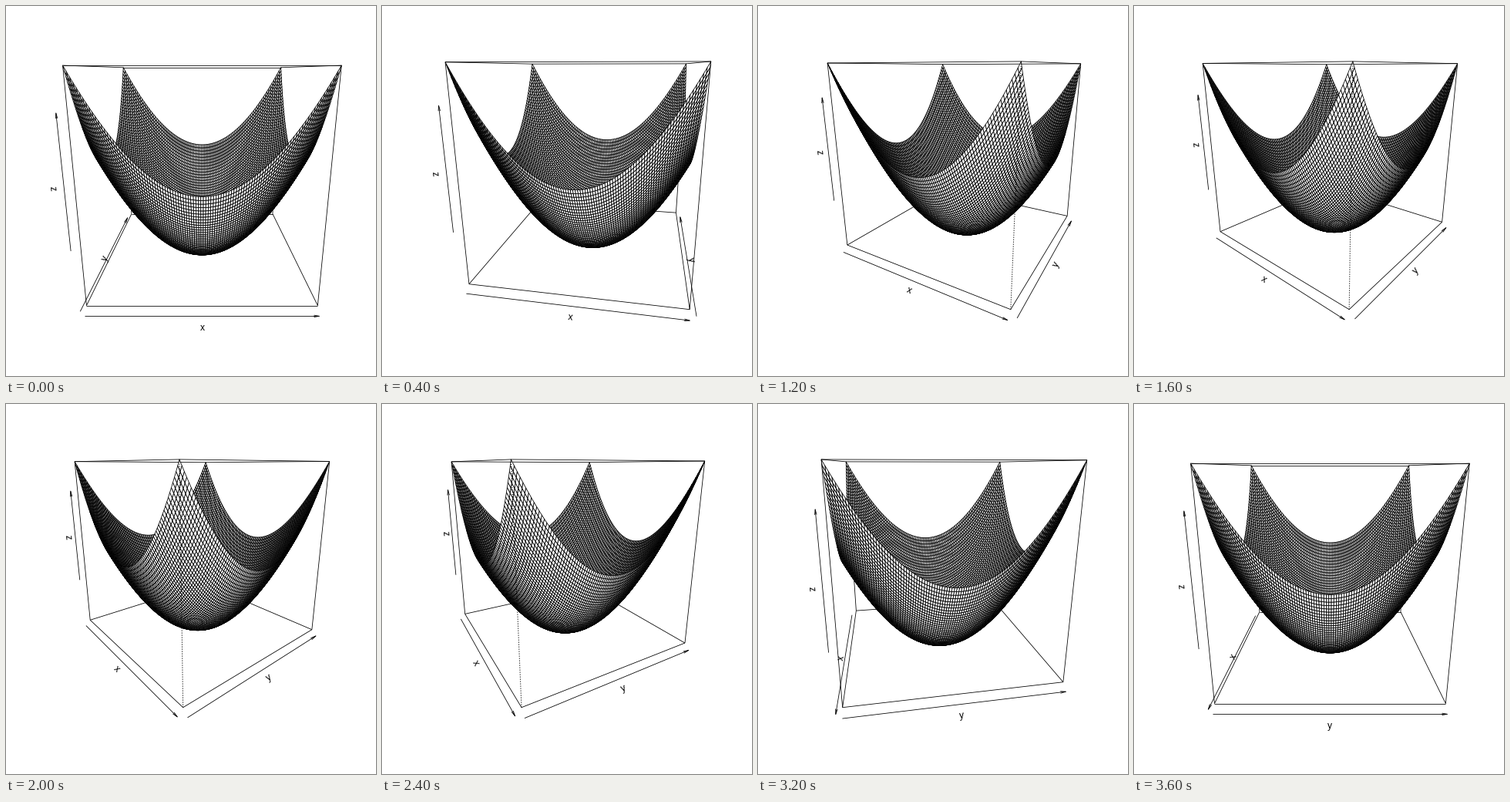
Recreate the animation shown at these times as a matplotlib script. Size 480 px wide and 480 px high, loop 4 s.

```python
from itertools import product

import numpy as np
import matplotlib.pyplot as plt
from matplotlib.animation import FuncAnimation
from matplotlib.collections import LineCollection, PolyCollection

SIZE, DPI = 480, 72
FRAMES, INTERVAL = 10, 400
STEP = 10                                  # degrees of azimuth per frame
PHI = np.radians(15)
DIST = 2 + np.sqrt(3)                      # eye to the centre of the box
CENTER = np.array([254.4, 232.8])          # plot region in pixels
REGION = np.array([390.72, 347.52])
LW = 0.8
TICK = 0.06                                # gap between box and arrows

# Paraboloid, scaled to the cube [-1, 1]^3
N = 100
RADIUS = 3
axis = np.linspace(-RADIUS, RADIUS, N)
gx, gy = np.meshgrid(axis, axis, indexing="ij")
gz = gx**2 + gy**2
z_lo, z_hi = gz.min(), gz.max()


def unit_z(z):
    return 2 * (z - z_lo) / (z_hi - z_lo) - 1


SURFACE = np.stack([gx / RADIUS, gy / RADIUS, unit_z(gz)], axis=-1)
Z_SPAN = unit_z(5), unit_z(15)             # the z arrow joins round tick values

CORNERS = np.array(list(product((-1, 1), repeat=3)), float)
EDGES = [(a, b) for a, b in product(CORNERS, repeat=2)
         if np.sum(a != b) == 1 and a.sum() < b.sum()]


def project(pts, theta):
    """Perspective view; returns plane coordinates (y up) and depth."""
    x, y, z = np.moveaxis(np.asarray(pts, float), -1, 0)
    right = x * np.cos(theta) + y * np.sin(theta)
    front = x * np.sin(theta) - y * np.cos(theta)
    up = z * np.cos(PHI) - front * np.sin(PHI)
    depth = DIST - z * np.sin(PHI) - front * np.cos(PHI)
    return np.stack([right / depth, up / depth], axis=-1), depth


def make_view(theta):
    """Fit the box into the plot region and return a point-to-pixel mapping."""
    flat, _ = project(CORNERS, theta)
    lo, hi = flat.min(axis=0), flat.max(axis=0)
    scale = (REGION / (hi - lo)).min() / 1.08

    def view(pts):
        xy, depth = project(pts, theta)
        return CENTER + (xy - (lo + hi) / 2) * [scale, -scale], depth

    return view


def quads(view):
    """Surface cells in painter's order."""
    xy, depth = view(SURFACE)

    def cells(a):
        return np.stack([a[:-1, :-1], a[1:, :-1], a[1:, 1:], a[:-1, 1:]], axis=2)

    far = cells(depth).max(axis=2).ravel()
    return cells(xy).reshape(-1, 4, 2)[np.argsort(-far, kind="stable")]


def split_edges(theta):
    """Edges lying only on faces turned to the eye are dotted."""
    eye = DIST * np.array([np.sin(theta) * np.cos(PHI),
                           -np.cos(theta) * np.cos(PHI), np.sin(PHI)])
    solid, dotted = [], []
    for a, b in EDGES:
        near = [a[i] * eye[i] > 1 for i in range(3) if a[i] == b[i]]
        (dotted if all(near) else solid).append((a, b))
    return solid, dotted


def axis_specs(theta, view):
    """Start, end and outward direction of the x, y and z arrows."""
    side = -1 if theta == 0 else 1
    floor = CORNERS[CORNERS[:, 2] < 0]
    left = floor[np.argmin(np.round(view(floor)[0][:, 0], 6))]
    cx, cy = left[:2]
    return [((-1, -1, -1), (1, -1, -1), (0, -1, -1)),
            ((side, -1, -1), (side, 1, -1), (side, 0, -1)),
            ((cx, cy, Z_SPAN[0]), (cx, cy, Z_SPAN[1]), (cx, cy, 0))]


def arrow(p, q, length=7.2, spread=np.radians(10)):
    back = np.arctan2(*(p - q)[::-1])
    barbs = [q + length * np.array([np.cos(back + s), np.sin(back + s)])
             for s in (-spread, spread)]
    return [np.array([p, q]), np.array([barbs[0], q, barbs[1]])]


def label_angle(p, q):
    dx, dy = q[0] - p[0], p[1] - q[1]
    return np.arctan2(dy if dx > 0 else -dy, abs(dx))


fig = plt.figure(figsize=(SIZE / DPI, SIZE / DPI), dpi=DPI, facecolor="white")
ax = fig.add_axes([0, 0, 1, 1])
ax.set(xlim=(0, SIZE), ylim=(SIZE, 0))
ax.axis("off")

frame_lines = LineCollection([], colors="black", linewidths=LW, zorder=1)
mesh = PolyCollection([], facecolors="white", edgecolors="black",
                      linewidths=LW, zorder=2)
mesh.set_snap(False)
dots = LineCollection([], colors="black", linewidths=1, zorder=3,
                      linestyles=[(0, (1.2, 1.8))])
for artist in (frame_lines, mesh, dots):
    ax.add_collection(artist, autolim=False)
labels = [ax.text(0, 0, s, fontsize=12, family="Liberation Sans", ha="center",
                  va="baseline", rotation_mode="anchor", zorder=1)
          for s in "xyz"]


def update(i):
    theta = np.radians(STEP * i)
    view = make_view(theta)
    solid, dotted = split_edges(theta)
    lines = [view(e)[0] for e in solid]

    for text, (a, b, out) in zip(labels, axis_specs(theta, view)):
        a, b, out = (np.array(v, float) for v in (a, b, out))
        p, q = view([a + TICK * out, b + TICK * out])[0]
        lines += arrow(p, q)
        angle = label_angle(p, q)
        spot = view((a + b) / 2 + 2 * TICK * out)[0]
        # drop the baseline by half a capital's height
        text.set_position(spot + 4.3 * np.array([np.sin(angle), np.cos(angle)]))
        text.set_rotation(np.degrees(angle))

    frame_lines.set_segments(lines)
    mesh.set_verts(quads(view))
    dots.set_segments([view(e)[0] for e in dotted])
    return [frame_lines, mesh, dots, *labels]


anim = FuncAnimation(fig, update, frames=FRAMES, interval=INTERVAL,
                     repeat=True, repeat_delay=0, blit=False)
plt.show()
```
